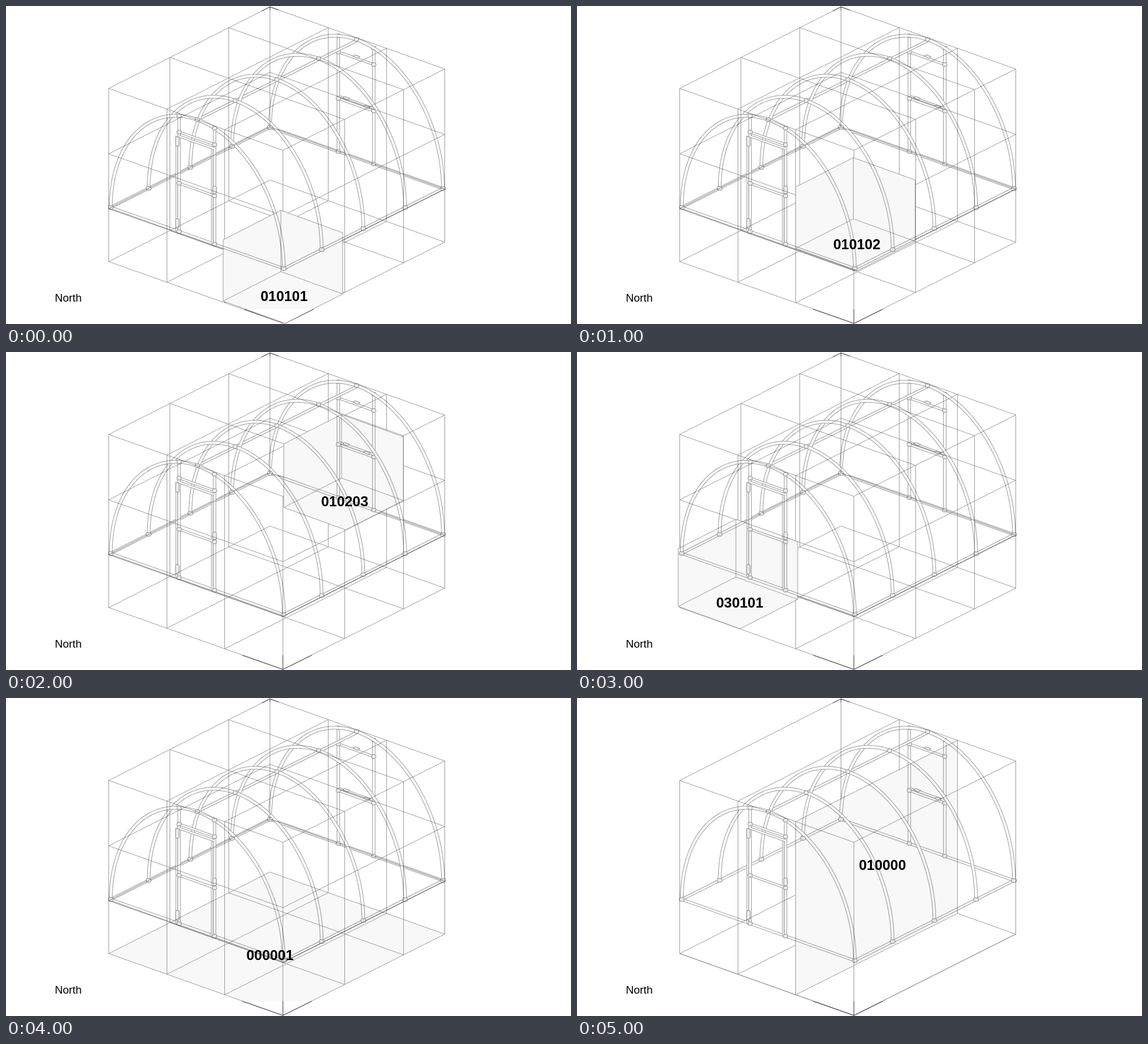
These frames come from a looping animation (960x540 px, 6000 ms). An HTML page:

```html
<!DOCTYPE html>
<html lang="en">
<head>
<meta charset="utf-8">
<title>Greenhouse zones</title>
<style>
  html, body { margin: 0; width: 100%; height: 100%; overflow: hidden; background: #fff; }
  svg { display: block; width: 100%; height: 100%; }
  text { font-family: "Liberation Sans", Arial, sans-serif; }
  .line { fill: none; stroke: #868686; stroke-width: .8; }
  .floor { fill: none; stroke: #686868; stroke-width: .8; }
  .dark { fill: none; stroke: #303030; stroke-width: .9; }
  .shade { fill: url(#tint); }
  .house { mix-blend-mode: multiply; }
  .edge, .core { fill: none; stroke-linejoin: round; }
  .edge { stroke: #9f9f9f; }
  .core { stroke: #fff; }
  .joint { fill: #eee; stroke: #7c7c7c; stroke-width: .9; }
  .code { font-size: 24px; font-weight: bold; text-anchor: middle; }
</style>
</head>
<body>
<svg viewBox="0 0 960 540" xmlns="http://www.w3.org/2000/svg">
  <defs>
    <linearGradient id="tint" gradientUnits="userSpaceOnUse" x1="0" y1="0" x2="0" y2="540">
      <stop offset=".9537" stop-color="#f8f8f8"/>
      <stop offset=".9537" stop-color="#fff"/>
    </linearGradient>
  </defs>
  <rect width="960" height="540" fill="#fff"/>
  <g id="zones"></g>
  <g id="house" class="house"></g>
  <text x="83" y="502" font-size="18.67">North</text>
  <text id="code" class="code"></text>
</svg>
<script>
const NS = "http://www.w3.org/2000/svg";
const $ = id => document.getElementById(id);

function add(parent, tag, attrs = {}) {
  const el = document.createElementNS(NS, tag);
  for (const k in attrs) el.setAttribute(k, attrs[k]);
  parent.appendChild(el);
  return el;
}
const path = (parent, d, cls = "line") => add(parent, "path", { d, class: cls });
const poly = (...pts) => "M" + pts.map(p => p.join(" ")).join("L");
const move = (p, x, y) => [p[0] + x, p[1] + y];

// Box: top corners, height and grid divisions
const W = [174, 140], N = [448, 1.5], E = [745, 107], S = [470, 245];
const HEIGHT = 294, MIDDLE = 111, GROUND = 204;
const COLS = [0, 1 / 3, 2 / 3, 1], ROWS = [0, .38, .745, 1];

// Points along a side; uprights sit on whole pixels
const split = (a, b, parts) => parts.map(k =>
  [Math.round(a[0] + (b[0] - a[0]) * k) + .5, a[1] + (b[1] - a[1]) * k]);
const west = split(W, S, COLS), east = split(N, E, COLS);
const north = split(W, N, ROWS), south = split(S, E, ROWS);
const low = p => move(p, 0, HEIGHT);
const rim = h => poly(...[west[0], east[0], east[3], west[3]].map(p => move(p, 0, h))) + "Z";

function drawTips(parent, front) {
  const back = east[0];
  path(parent, poly(move(back, -14, 7), back, move(back, 15, 5.5)) + poly(back, move(back, 0, 6)), "dark");
  path(parent, poly(move(front, -69, -24), front, move(front, 49, -24)), "dark");
}

function drawGrid(parent, cell) {
  for (const h of [0, HEIGHT]) {
    path(parent, rim(h));
    for (const i of [1, 2])
      for (const [a, b] of [[west, east], [north, south]])
        path(parent, poly(move(a[i], 0, h), move(b[i], 0, h)));
  }
  path(parent, rim(MIDDLE));
  path(parent, rim(GROUND), "floor");
  for (const side of [west, east, north, south])
    for (const p of side.slice(1, 3)) path(parent, poly(p, low(p)));
  for (const p of [west[0], west[3], east[3]]) path(parent, poly(p, low(p)));
  path(parent, poly(east[0], move(east[0], 0, GROUND)));
  const atTip = cell && cell.front[1] > 515;
  if (!atTip) path(parent, poly(low(west[3]), move(low(west[3]), 0, -24)), "dark");
  drawTips(parent, atTip ? cell.front : low(west[3]));
}

// An open cell: two back walls and a floor, placed by its front corner
function drawCell(parent, { front, h }) {
  const left = move(front, -105, -38), right = move(front, 98, -50), back = move(left, 98, -50);
  const [l, r, t] = [left, right, back].map(p => move(p, 0, -h));
  const outline = poly(l, t, r, right, front, left) + "Z";
  path(parent, outline, "shade");
  path(parent, outline);
  path(parent, poly(left, back, right) + poly(t, back));
}

function drawSlice(parent) {
  const panel = i => poly(west[i], east[i], low(east[i]), low(west[i])) + "Z";
  path(parent, rim(HEIGHT));
  path(parent, poly(east[0], low(east[0])));
  path(parent, panel(1));
  path(parent, panel(2), "shade");
  path(parent, panel(2));
  path(parent, rim(0));
  path(parent, poly(low(west[0]), low(west[3]), low(east[3])));
  for (const p of [west[0], west[3], east[3]]) path(parent, poly(p, low(p)));
  path(parent, poly(low(west[3]), move(low(west[3]), 0, -24)), "dark");
  drawTips(parent, low(west[3]));
}

// House space: u across the front, v along the length, z upwards in pixels
const at = (u, v, z = 0) => [178 + 294 * u + 270.5 * v, 342 + 104 * u - 136 * v - z];
const roof = u => 201 * Math.sqrt(Math.max(0, 1 - (2 * u - 1) ** 2));
const bays = [-2, -1, 0, 1, 2].map(i => Math.min(1, Math.max(0, .5 + i * .262)));

function tube(parent, pts, w = 6) {
  const d = poly(...pts);
  path(parent, d, "edge").setAttribute("stroke-width", w);
  path(parent, d, "core").setAttribute("stroke-width", w - 2.1);
}
function joint(parent, [x, y], w = 7, h = 6) {
  add(parent, "rect", { x: x - w / 2, y: y - h / 2, width: w, height: h, rx: 1.8, class: "joint" });
}
function arch(parent, v) {
  const pts = [];
  for (let i = 0; i <= 60; i++) {
    const u = (1 - Math.cos(Math.PI * i / 60)) / 2;
    pts.push(at(u, v, roof(u)));
  }
  tube(parent, pts);
}
function seam(parent, v) {
  const [x, y] = at(.825, v, roof(.825));
  path(parent, `M${x - 5} ${y - 7}l10 14`, "core").setAttribute("stroke-width", 2.5);
}

const POSTS = [.395, .6];
function door(parent, v, rails) {
  const [a, b] = POSTS;
  for (const u of POSTS) tube(parent, [at(u, v), at(u, v, roof(u))], 5.5);
  for (const z of rails) tube(parent, [at(a, v, z), at(b, v, z)], 4.5);
  for (const u of POSTS)
    for (const z of [0, roof(u), rails[0], rails[rails.length - 1]]) joint(parent, at(u, v, z));
}

function drawHouse(g) {
  tube(g, [at(0, 1), at(1, 1)], 5);
  tube(g, [at(0, 0), at(0, 1)], 5);
  door(g, 1, [169, 94, 90]);
  for (const [u, z] of [[.5, 171], [.44, 94], [.56, 92]]) {
    const [x, y] = at(u, 1, z);
    path(g, `M${x - 6} ${y - 2}l4 -2 8 3 -4 3z`, "joint");
  }

  tube(g, [at(.5, 0, 201), at(.5, 1, 199)], 5);
  for (const v of [...bays].reverse()) arch(g, v);
  seam(g, 0);
  seam(g, 1);
  tube(g, [at(1, 0), at(1, 1)], 5);
  tube(g, [at(0, 0), at(1, 0)], 5);

  for (const u of POSTS) tube(g, [move(at(u, 0), -4, 0), move(at(u, 0, 163), -4, 0)], 4);
  door(g, 0, [169, 162, 82]);
  for (const z of [153, 14]) joint(g, move(at(POSTS[0], 0, z), -3, 0), 6, 16);
  joint(g, at(POSTS[1], 0, 92), 6, 13);

  for (const v of bays) {
    joint(g, at(0, v), 8);
    joint(g, at(1, v), 8);
    joint(g, at(.5, v, 201));
  }
}

const scenes = [
  { code: "010101", at: [472.5, 501], cell: { front: [474, 539], h: 104 } },
  { code: "010102", at: [475.5, 413], cell: { front: [476.5, 449.5], h: 104 } },
  { code: "010203", at: [575.5, 262], cell: { front: [577, 302], h: 108 } },
  { code: "030101", at: [276.5, 434], cell: { front: [277, 470], h: 98 } },
  { code: "000001", at: [448.5, 445], base: true },
  { code: "010000", at: [519, 292], slice: true }
];

for (const s of scenes) {
  const g = s.group = add($("zones"), "g");
  if (s.slice) { drawSlice(g); continue; }
  if (s.base) path(g, rim(HEIGHT), "shade");
  drawGrid(g, s.cell);
  if (s.cell) drawCell(g, s.cell);
}
drawHouse($("house"));

const STEP = 1000;
const start = performance.now();

function render(ms) {
  const now = scenes[Math.floor(ms / STEP) % scenes.length];
  for (const s of scenes) s.group.setAttribute("display", s === now ? "inline" : "none");
  const label = $("code");
  label.textContent = now.code;
  label.setAttribute("x", now.at[0]);
  label.setAttribute("y", now.at[1]);
}
function tick() {
  render(performance.now() - start);
  requestAnimationFrame(tick);
}
tick();
</script>
</body>
</html>
```
